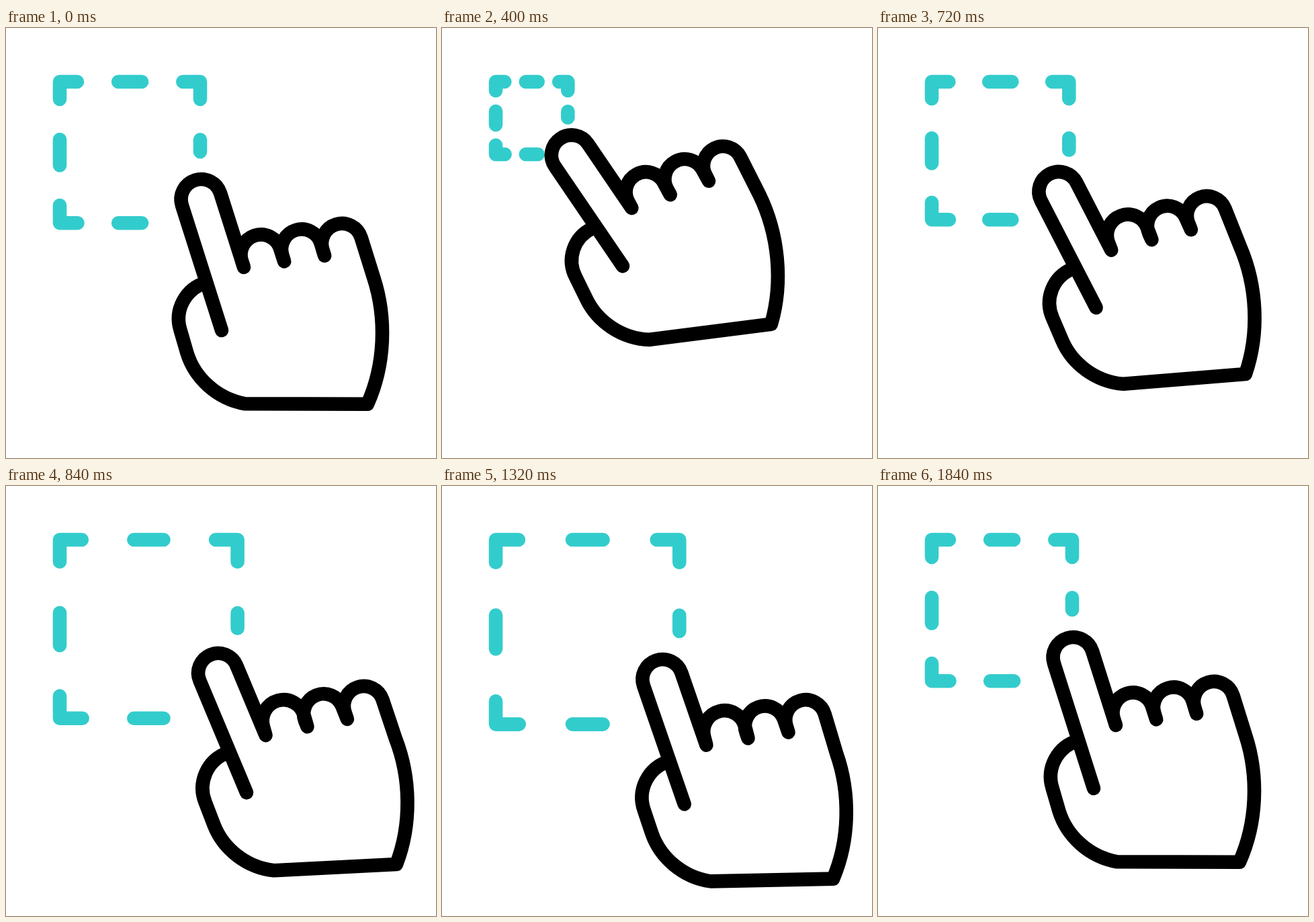
An HTML page with a canvas that plays this animation: 640x640 px, repeating every 2 s.

```html
<!DOCTYPE html>
<html lang="en">
<head>
<meta charset="utf-8">
<title>Resize gesture</title>
<style>
html, body { margin: 0; width: 100%; height: 100%; overflow: hidden; background: #fff; }
canvas { display: block; width: 640px; height: 640px; }
</style>
</head>
<body>
<canvas id="stage" width="640" height="640"></canvas>
<script>
const ctx = document.getElementById('stage').getContext('2d');
const LOOP = 2000, STEP = 40;

// Each segment eases from one pose to the next; arc bends the hand's travel.
const segments = [
  { start: 40, end: 440, from: 0, to: 1, arc: [-2.3, 0.8] },
  { start: 440, end: 1000, from: 1, to: 2, arc: [1, -1] },
  { start: 1000, end: 1840, from: 2, to: 0, arc: [0.3, 1.4] }
];

// x, y in the rest, shrunk and stretched poses
const hand = {
  thumb:     [298, 379, 221.2, 296, 355, 423],
  palmTop:   [259.6, 449.8, 197.5, 368.4, 320.5, 497.5],
  palmLow:   [269.5, 484, 213.5, 400.6, 332.5, 531],
  wristL:    [356, 559.3, 308.2, 461, 420.7, 600.6],
  wristR:    [538, 559.8, 488.8, 437.2, 603, 594.8],
  side:      [547, 371, 470, 243.5, 606, 409],
  pinky:     [500, 321, 416, 201.7, 560.5, 359.3],
  gap3:      [474.2, 339, 395, 224.4, 535, 378],
  ring:      [440, 329.4, 359.4, 222, 500, 368.8],
  gap2:      [414.2, 347.5, 337.9, 245.2, 475, 387],
  middle:    [379.5, 337.4, 301.7, 241.5, 440, 377.3],
  gap1:      [354, 356, 280.5, 265.3, 412, 398],
  tip:       [290.5, 255, 190.1, 187.3, 346, 301.8],
  indexBase: [321, 450, 267.8, 351.5, 379.5, 483]
};
const boxCorner = [289, 290.3, 184.4, 185, 384.2, 385.5];

function phase(t) {
  const s = segments.find(g => t < g.end) || segments[2];
  const u = Math.min(1, Math.max(0, (t - s.start) / (s.end - s.start)));
  return { s, p: u * u * (3 - 2 * u) };
}

function place(keys, { s, p }, bend) {
  const k = bend * 4 * p * (1 - p);
  return [0, 1].map(i => {
    const a = keys[s.from * 2 + i], b = keys[s.to * 2 + i];
    return a + (b - a) * p + s.arc[i] * k;
  });
}

// Cubic curve whose handles are given along and across the chord.
function bow(a, b, u1, v1, u2, v2) {
  const ex = b[0] - a[0], ey = b[1] - a[1];
  const at = (u, v) => [a[0] + ex * u + ey * v, a[1] + ey * u - ex * v];
  ctx.bezierCurveTo(...at(u1, v1), ...at(u2, v2), ...b);
}

// Rounded finger: up from a, around the centre c, down to b.
function finger(a, c, b) {
  const dx = (a[0] + b[0]) / 2 - c[0], dy = (a[1] + b[1]) / 2 - c[1];
  const len = Math.hypot(dx, dy), nx = dy / len, ny = -dx / len;
  const r = Math.abs((a[0] - b[0]) * nx + (a[1] - b[1]) * ny) / 2;
  const turn = Math.atan2(ny, nx);
  ctx.lineTo(...a);
  ctx.arc(c[0], c[1], r, turn, turn - Math.PI, true);
  ctx.lineTo(...b);
}

function drawBox([right, bottom]) {
  const o = 80, w = right - o, h = bottom - o;
  const line = (...pts) => {
    pts.forEach(([x, y], i) => ctx[i ? 'lineTo' : 'moveTo'](o + x * w, o + y * h));
  };
  ctx.strokeStyle = '#33cccc';
  ctx.beginPath();
  line([0, 0.123], [0, 0], [0.124, 0]);
  line([0.417, 0], [0.584, 0]);
  line([0.877, 0], [1, 0], [1, 0.123]);
  line([1, 0.41], [1, 0.496]);
  line([0, 0.409], [0, 0.592]);
  line([0, 0.8755], [0, 1], [0.127, 1]);
  line([0.417, 1], [0.584, 1]);
  ctx.stroke();
}

function drawHand(q) {
  ctx.strokeStyle = '#000';
  ctx.beginPath();
  ctx.moveTo(...q.thumb);
  bow(q.thumb, q.palmTop, 0.274, -0.283, 0.727, -0.283);
  ctx.lineTo(...q.palmLow);
  bow(q.palmLow, q.wristL, 0.2875, -0.177, 0.682, -0.192);
  ctx.lineTo(...q.wristR);
  bow(q.wristR, q.side, 0.312, -0.123, 0.683, -0.121);
  finger(q.side, q.pinky, q.gap3);
  finger(q.gap3, q.ring, q.gap2);
  finger(q.gap2, q.middle, q.gap1);
  finger(q.gap1, q.tip, q.indexBase);
  ctx.stroke();
}

function draw(now) {
  const t = Math.floor((now % LOOP) / STEP) * STEP;
  const ph = phase(t), q = {};
  for (const name in hand) q[name] = place(hand[name], ph, 1);
  ctx.fillStyle = '#fff';
  ctx.fillRect(0, 0, 640, 640);
  ctx.lineWidth = 20.6;
  ctx.lineCap = ctx.lineJoin = 'round';
  drawBox(place(boxCorner, ph, 0));
  drawHand(q);
  requestAnimationFrame(draw);
}
requestAnimationFrame(draw);
</script>
</body>
</html>
```
